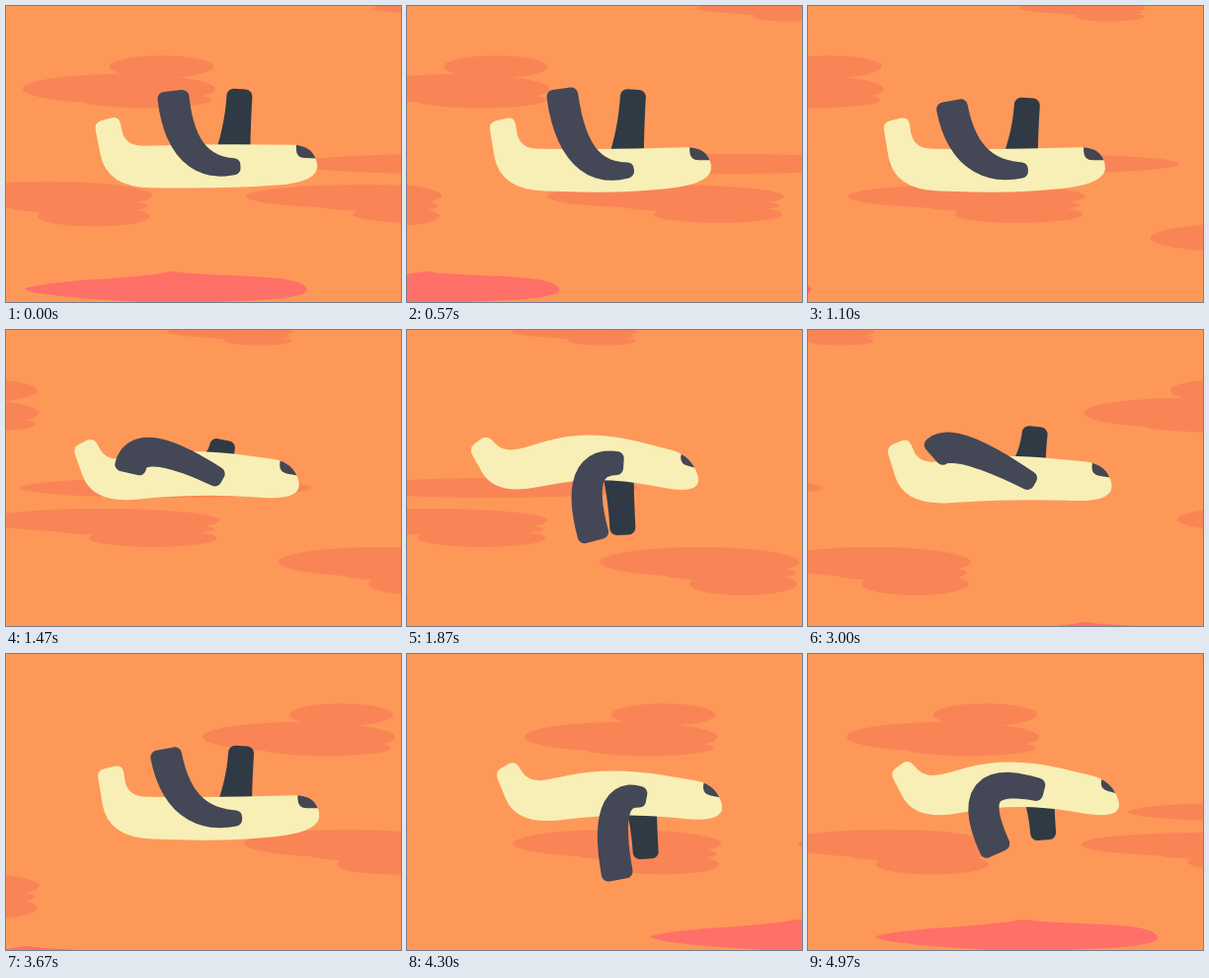
An HTML page that plays this animation: 400 px wide and 300 px high, repeating every 5.01 s.

```html
<!DOCTYPE html>
<html lang="en">
<head>
<meta charset="utf-8">
<title>Flapping glider</title>
<style>
  html, body { margin: 0; width: 100%; height: 100%; overflow: hidden; background: #fe9859; }
  svg { display: block; width: 100vw; height: 100vh; }
</style>
</head>
<body>
<svg viewBox="0 0 400 300">
  <defs><clipPath id="hull"><path id="hullShape"/></clipPath></defs>
  <rect width="400" height="300" fill="#fe9859"/>
  <g id="sky" fill="#f98556"></g>
  <g id="ground" fill="#ff7068"></g>
  <g id="plane" stroke-linejoin="round">
    <path id="far" fill="#303a44" stroke="#303a44"/>
    <path id="body" fill="#f8efb6"/>
    <g clip-path="url(#hull)"><path id="nose" fill="#454650"/></g>
    <path id="near" fill="#444755" stroke="#444755"/>
  </g>
</svg>
<script>
const NS = "http://www.w3.org/2000/svg";
const $ = id => document.getElementById(id);
const mod = (a, b) => ((a % b) + b) % b;

const LOOP = 5010, STEPS = 100;
const FLAP = 10.2;      // steps per wing beat
const LAP = 102.6;      // steps until the scenery repeats
const ROUND = 7;        // corner radius of the wings

// Hull corners: resting place, swing with each beat, softness.
const HULL = [
  { x: 79, y: 119, dx: 5, dy: -1, r: 8 },     // tail
  { x: 101, y: 109, dx: 9, dy: 3, r: 8 },
  { x: 113, y: 135, dx: 2, dy: 10, r: 20 },
  { x: 197, y: 123, dx: 2, dy: 23, r: 60 },   // back
  { x: 303, y: 135, dx: 3, dy: 8, r: 22 },    // nose
  { x: 312, y: 174, dx: 0, dy: 6, r: 45 },
  { x: 212, y: 169, dx: 7, dy: 22, r: 60 },   // belly
  { x: 98, y: 177, dx: -3, dy: 9, r: 45 }
];

// Near wing through one beat: time, elbow, tip.
const BEAT = [
  { at: 0, joints: [171, 166, 163, 93] },
  { at: 1.6, joints: [167, 170, 154, 103] },
  { at: 4.4, joints: [186, 138, 201, 222] },
  { at: 6.4, joints: [180, 132, 200, 207] },
  { at: 7.2, joints: [145, 117, 181, 196] },
  { at: 9, joints: [148, 108, 131, 123] }
];

// side: whether the smaller lobe hangs below (1) or sits above (-1).
const CLOUDS = [
  { x: 17, y: 84, w: 195, h: 15, v: 6.15, side: -1 },
  { x: 372, y: 2, w: 128, h: 6, v: 7.2, side: 1 },
  { x: 290, y: 160, w: 295, h: 10, v: 9.5, side: 0 },
  { x: 243, y: 193, w: 240, h: 12, v: 9.2, side: 1 },
  { x: -63, y: 192, w: 211, h: 14, v: 10.25, side: 1 },
  { x: 569, y: 235, w: 202, h: 15, v: 10.1, side: 1 }
];
const HILLS = [
  { x: 19, y: 0, w: 288, v: 13.7 },
  { x: 1330, y: 27, w: 288, v: 20 }
];
const HILL = "M0 286C40 276 100 278 150 269C200 276 280 270 286 287" +
  "C286 300 200 298 160 302C110 300 0 294 0 286Z";

function add(parent, tag, attrs) {
  const el = document.createElementNS(NS, tag);
  for (const k in attrs) el.setAttribute(k, attrs[k]);
  return parent.appendChild(el);
}

for (const c of CLOUDS) {
  c.el = add($("sky"), "g", {});
  const lobe = (cx, cy, rx, ry) => add(c.el, "ellipse",
    { cx: cx * c.w, cy: cy * c.h, rx: rx * c.w, ry: ry * c.h });
  lobe(0.5, 0, 0.5, 1);
  lobe(0.64, 0.75 * Math.abs(c.side), 0.34, 0.55);
  lobe(0.72, 1.5 * c.side, 0.27, 0.75);
}
for (const h of HILLS) h.el = add($("ground"), "path", { d: HILL });
const SCENERY = CLOUDS.concat(HILLS);

const wave = (step, lag, period) => Math.cos(2 * Math.PI * (step - lag) / period);

// Smooth periodic interpolation through the beat.
function joints(phase) {
  const n = BEAT.length;
  const at = j => BEAT[mod(j, n)].at + FLAP * Math.floor(j / n);
  const val = (j, k) => BEAT[mod(j, n)].joints[k];
  let i = n - 1;
  while (BEAT[i].at > phase) i--;
  const h = at(i + 1) - at(i), u = (phase - at(i)) / h;
  const slope = (j, k) => h * (val(j + 1, k) - val(j - 1, k)) / (at(j + 1) - at(j - 1));
  return BEAT[i].joints.map((a, k) => {
    const b = val(i + 1, k), ease = u * u * (3 - 2 * u);
    return a + (b - a) * ease +
      u * (1 - u) * ((1 - u) * slope(i, k) - u * slope(i + 1, k));
  });
}

const xy = (x, y) => x.toFixed(2) + " " + y.toFixed(2);

// Closed polygon with softened corners.
function soft(pts) {
  const toward = (a, b) => {
    const k = Math.min(0.5, a.r / Math.hypot(b.x - a.x, b.y - a.y));
    return xy(a.x + (b.x - a.x) * k, a.y + (b.y - a.y) * k);
  };
  const n = pts.length;
  return "M" + pts.map((p, i) =>
    toward(p, pts[mod(i - 1, n)]) + "Q" + xy(p.x, p.y) + " " + toward(p, pts[(i + 1) % n])
  ).join("L") + "Z";
}

// Bent limb from root a past elbow b to tip c, its half width going from h0 to h1.
function limb(a, b, c, h0, h1) {
  const left = [], right = [], N = 14;
  for (let i = 0; i <= N; i++) {
    const t = i / N, s = 1 - t;
    const p = k => s * s * a[k] + 2 * s * t * b[k] + t * t * c[k];
    const d = k => s * (b[k] - a[k]) + t * (c[k] - b[k]);
    const h = (h1 + (h0 - h1) * s * s - ROUND) / Math.hypot(d(0), d(1));
    left.push(xy(p(0) - d(1) * h, p(1) + d(0) * h));
    right.unshift(xy(p(0) + d(1) * h, p(1) - d(0) * h));
  }
  return "M" + left.concat(right).join("L") + "Z";
}

function drawNose(back, tip) {
  const slope = (tip.y - back.y) / (tip.x - back.x);
  const ang = Math.atan(slope), cos = Math.cos(ang), sin = Math.sin(ang);
  const at = (x, y, r) => ({
    x: tip.x + 30 * slope + x * cos - y * sin, y: tip.y + x * sin + y * cos, r
  });
  $("nose").setAttribute("d", soft([at(-18, -14, 1), at(-18, 13, 9), at(16, 14, 1), at(16, -14, 1)]));
}

function draw(step) {
  for (const s of SCENERY) {
    const x = mod(s.x - s.v * step + s.w, s.v * LAP) - s.w;
    s.el.setAttribute("transform", `translate(${x.toFixed(2)} ${s.y})`);
  }

  const sway = 11.7 * wave(step, 86, 102);
  $("plane").setAttribute("transform", `translate(${sway.toFixed(2)} 0)`);

  const bob = wave(step, 1.2, FLAP);
  const hull = HULL.map(p => ({ x: p.x + p.dx * bob, y: p.y + p.dy * bob, r: p.r }));
  const shape = soft(hull);
  $("body").setAttribute("d", shape);
  $("hullShape").setAttribute("d", shape);
  drawNose(hull[3], hull[4]);

  const root = [224, 151 + 16 * bob];
  const [ex, ey, tx, ty] = joints(mod(step, FLAP));
  $("near").setAttribute("d", limb(root, [ex, ey], [tx, ty], 10 - 2 * bob, 16));

  // The far wing lingers at both ends of its swing.
  const beat = wave(step, 0.3, FLAP);
  const tip = [230, 148 - 57 * beat * (1.4 - 0.4 * beat * beat)];
  const base = [223, root[1] - 10];
  const mid = [228, (base[1] + tip[1]) / 2];
  $("far").setAttribute("d", limb(base, mid, tip, 18, 13));
}

for (const id of ["near", "far"]) $(id).setAttribute("stroke-width", 2 * ROUND);

// The picture advances in alternating holds of 70 and 30 ms.
function tick(now) {
  const t = now % LOOP;
  const step = 2 * Math.floor(t / 100) + (t % 100 >= 70 ? 1 : 0);
  draw(Math.min(step, STEPS - 1));
  requestAnimationFrame(tick);
}
draw(0);
requestAnimationFrame(tick);
</script>
</body>
</html>
```
